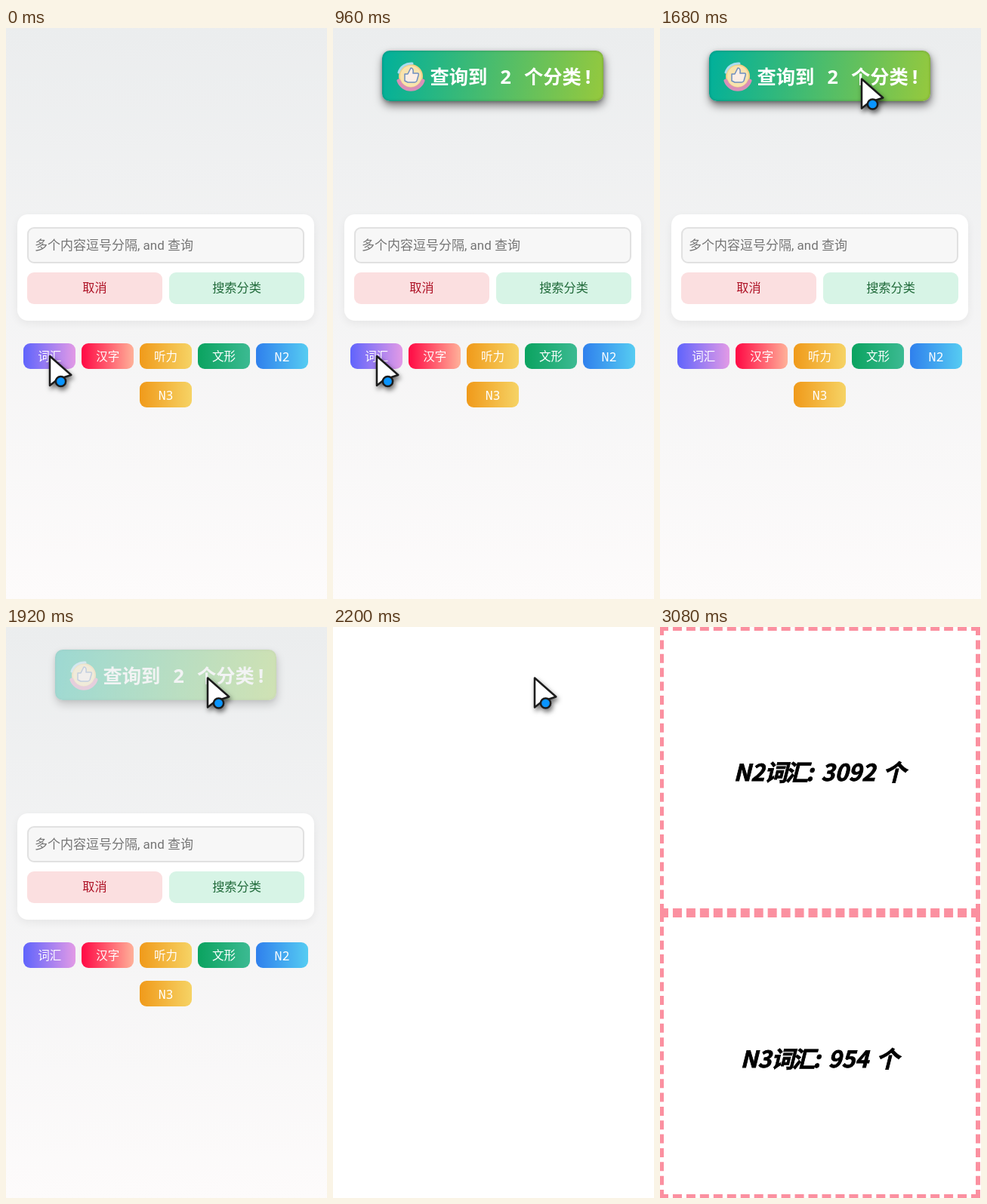
Animation of 425 by 757 pixels, one loop 3.32 s. Source, as an HTML page:

```html
<!DOCTYPE html>
<html lang="zh-CN">
<head>
<meta charset="utf-8">
<style>
html, body { margin: 0; width: 100%; height: 100%; overflow: hidden; background: #fff; }
body { position: relative; font-family: Roboto, "Noto Sans CJK SC", "Noto Sans CJK", sans-serif; }
div, svg { position: absolute; box-sizing: border-box; }
#page { left: 0; top: 0; width: 425px; overflow: hidden; }
#inner { width: 425px; height: 757px; background: linear-gradient(#ebedee, #fdfbfb); }
#card { left: 15px; top: 247px; width: 393px; height: 141px; border-radius: 14px; background: #fff; box-shadow: 0 4px 12px rgba(0,0,0,.06); }
#field { left: 13px; top: 17px; width: 367px; height: 48px; border: 2px solid #e1e1e1; border-radius: 9px; background: #f7f7f7; padding-left: 8px; font-size: 17px; line-height: 44px; white-space: pre; }
.btn { top: 77px; width: 179px; height: 42px; border-radius: 9px; font-size: 16.2px; line-height: 42px; text-align: center; }
.tag { width: 69px; height: 34px; border-radius: 9px; color: #fff; font: 15.5px/35px "Noto Sans Mono", "Noto Sans CJK SC", "Noto Sans CJK", monospace; text-align: center; }
.latin { font-size: 16.6px; }
#toast { left: 65px; top: 30px; width: 293px; height: 67px; border-radius: 10px; background: linear-gradient(100deg, #00b09b, #96c93d); box-shadow: 1px 6px 12px rgba(0,0,0,.5), 0 1px 4px rgba(0,0,0,.25), inset 0 0 3px 1px rgba(0,0,0,.14); }
#toast text { font: bold 25.3px "Noto Sans Mono", "Noto Sans CJK SC", "Noto Sans CJK", monospace; fill: #fff; }
.result { left: -1px; width: 425px; border: 6px dashed #fb90a0; background: #fff; text-align: center; font: italic 900 30.5px/372px "Noto Sans CJK SC", "Noto Sans CJK", sans-serif; color: #000; white-space: pre; word-spacing: 3px; -webkit-text-stroke: .8px #000; }
.result span { letter-spacing: -3px; }
#cursor { left: 0; top: 0; overflow: visible; filter: drop-shadow(2px 4px 3px rgba(0,0,0,.55)); }
</style>
</head>
<body>
<div id="page"><div id="inner">
  <div id="card">
    <div id="field"></div>
    <div class="btn" style="left:13px;background:#fbdfe0;color:#ae1226">取消</div>
    <div class="btn" style="left:201px;background:#d7f4e6;color:#206a3a">搜索分类</div>
  </div>
</div></div>
<div id="results">
  <div class="result" style="top:-1px;height:380px">N2<span>词汇</span>: 3092 个</div>
  <div class="result" style="top:379px;height:379px">N3<span>词汇</span>: 954 个</div>
</div>
<div id="toast">
  <svg width="293" height="67">
    <g stroke-linecap="round" stroke-linejoin="round">
      <circle cx="38" cy="34" r="15" fill="#f8e3ad" stroke="#f2cf85" stroke-width="2"/>
      <path d="M22 29A17 17 0 0 1 40 17" fill="none" stroke="#a8dcf0" stroke-width="3"/>
      <path d="M22 40A17 17 0 0 0 54 40" fill="none" stroke="#d98fb8" stroke-width="5"/>
      <path d="M30 31h4l4-8q4 0 3 7h6q2 0 1 3l-2 7q-1 2-3 2h-9l-4-2Z" fill="#fbeee6" stroke="#6e8fc0" stroke-width="1.5"/>
    </g>
    <text x="63.5" y="44">查询到</text>
    <text x="156" y="44">2</text>
    <text x="188" y="44">个分类</text>
    <text x="265" y="44">!</text>
  </svg>
</div>
<svg id="cursor" width="34" height="46">
  <path d="M1 1V40L11 32L29.3 26Z" fill="#fff" stroke="#1c1c1c" stroke-width="2.5" stroke-linejoin="round"/>
  <circle cx="15.5" cy="34.5" r="6.6" fill="#0a95ff" stroke="#1c1c1c" stroke-width="2.5"/>
</svg>
<script>
const LOOP = 3320;
const $ = id => document.getElementById(id);
const [page, inner, field, toast, results, cursor] =
  ['page', 'inner', 'field', 'toast', 'results', 'cursor'].map($);
const amber = ['#f09a1a', '#f6d365'];

[['词汇', '#6064fc', '#e29ae6'], ['汉字', '#ff0844', '#ffb199'], ['听力', ...amber],
 ['文形', '#0ba360', '#3cba92'], ['N2', '#2f80ed', '#56ccf2'], ['N3', ...amber]]
.forEach(([label, from, to], i) => {
  const tag = document.createElement('div');
  tag.className = label[0] === 'N' ? 'tag latin' : 'tag';
  tag.textContent = label;
  const col = i < 5 ? i : 2;
  tag.style.cssText = `left:${23.3 + col * 76.9}px;top:${i < 5 ? 417.5 : 469}px;` +
    `background:linear-gradient(90deg,${from},${to})`;
  inner.append(tag);
});

const span = (t, a, b) => Math.min(1, Math.max(0, (t - a) / (b - a)));
const mix = (a, b, p) => a + (b - a) * p;
const easeOut = (p, n) => 1 - (1 - p) ** n;
const swing = p => .5 - Math.cos(p * Math.PI) / 2;

function draw(t) {
  const typed = t >= 560 && t < 880;
  field.textContent = typed ? '词汇' : '多个内容逗号分隔, and 查询';
  field.style.color = typed ? '#000' : '#757575';

  const drop = easeOut(span(t, 850, 960), 2);
  toast.style.transform = `translateY(${mix(-110, 0, drop)}px)`;
  toast.style.opacity = Math.min(drop * 1.5, 1 - span(t, 1790, 1985));

  const fold = swing(span(t, 1987, 2178));
  page.style.height = 757 * (1 - fold) + 'px';
  inner.style.transform = `translateY(${Math.round(-287 * fold)}px)`;
  results.style.opacity = span(t, 2370, 2520);

  const go = span(t, 1160, 1680), leave = span(t, 2850, 3075);
  let x = mix(57, 266, easeOut(go, 1.93)), y = mix(434, 66.5, easeOut(go, 2.36));
  x = mix(x, 430, leave);
  y = mix(y, 555, leave);
  cursor.style.transform = `translate(${x}px,${y}px)`;
  cursor.style.visibility = leave < 1 ? 'visible' : 'hidden';
}

const start = performance.now();
function tick() {
  draw((performance.now() - start) % LOOP);
  requestAnimationFrame(tick);
}
tick();
</script>
</body>
</html>
```
